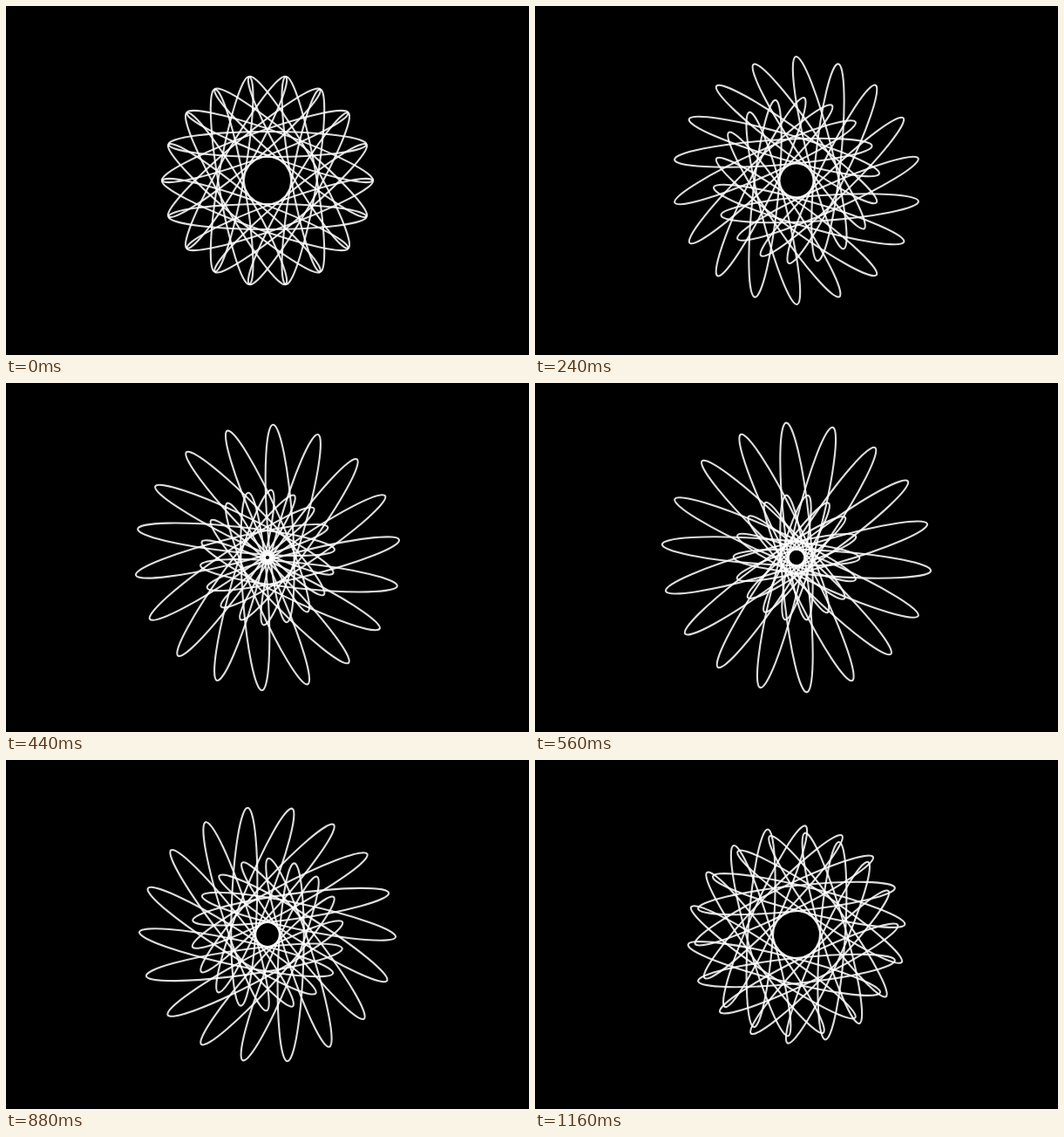
These frames come from a looping animation (600 by 400 pixels, 1.2 s). An HTML page:

```html
<!DOCTYPE html>
<html lang="en">
<head>
<meta charset="utf-8">
<title>Spinning ellipses</title>
<style>
  html, body { margin: 0; width: 100%; height: 100%; overflow: hidden; background: #000; }
  svg { display: block; width: 100%; height: 100%; }
  ellipse { fill: none; stroke: #fff; stroke-width: 2.1; stroke-opacity: .87; }
</style>
</head>
<body>
<svg id="stage" viewBox="0 0 600 400"></svg>
<script>
  const LOOP = 1200;
  const STEP = 40;
  const COUNT = 18;
  const ORBIT = 41.5;
  const RX = 113.5;
  const RY = 14.5;

  const stage = document.getElementById("stage");
  const rings = Array.from({ length: COUNT }, () => {
    const ring = document.createElementNS("http://www.w3.org/2000/svg", "ellipse");
    ring.setAttribute("rx", RX);
    ring.setAttribute("ry", RY);
    stage.appendChild(ring);
    return ring;
  });

  // Centres stay on a circle; every ellipse makes half a turn per loop.
  function draw(ms) {
    const spin = 180 * ms / LOOP;
    rings.forEach((ring, i) => {
      const turn = i * 360 / COUNT;
      ring.setAttribute("transform",
        `translate(300 200) rotate(${turn}) translate(0 ${ORBIT}) rotate(${spin})`);
    });
  }

  const start = performance.now();

  function tick() {
    const ms = (performance.now() - start) % LOOP;
    draw(Math.floor(ms / STEP) * STEP);
    requestAnimationFrame(tick);
  }

  draw(0);
  requestAnimationFrame(tick);
</script>
</body>
</html>
```
